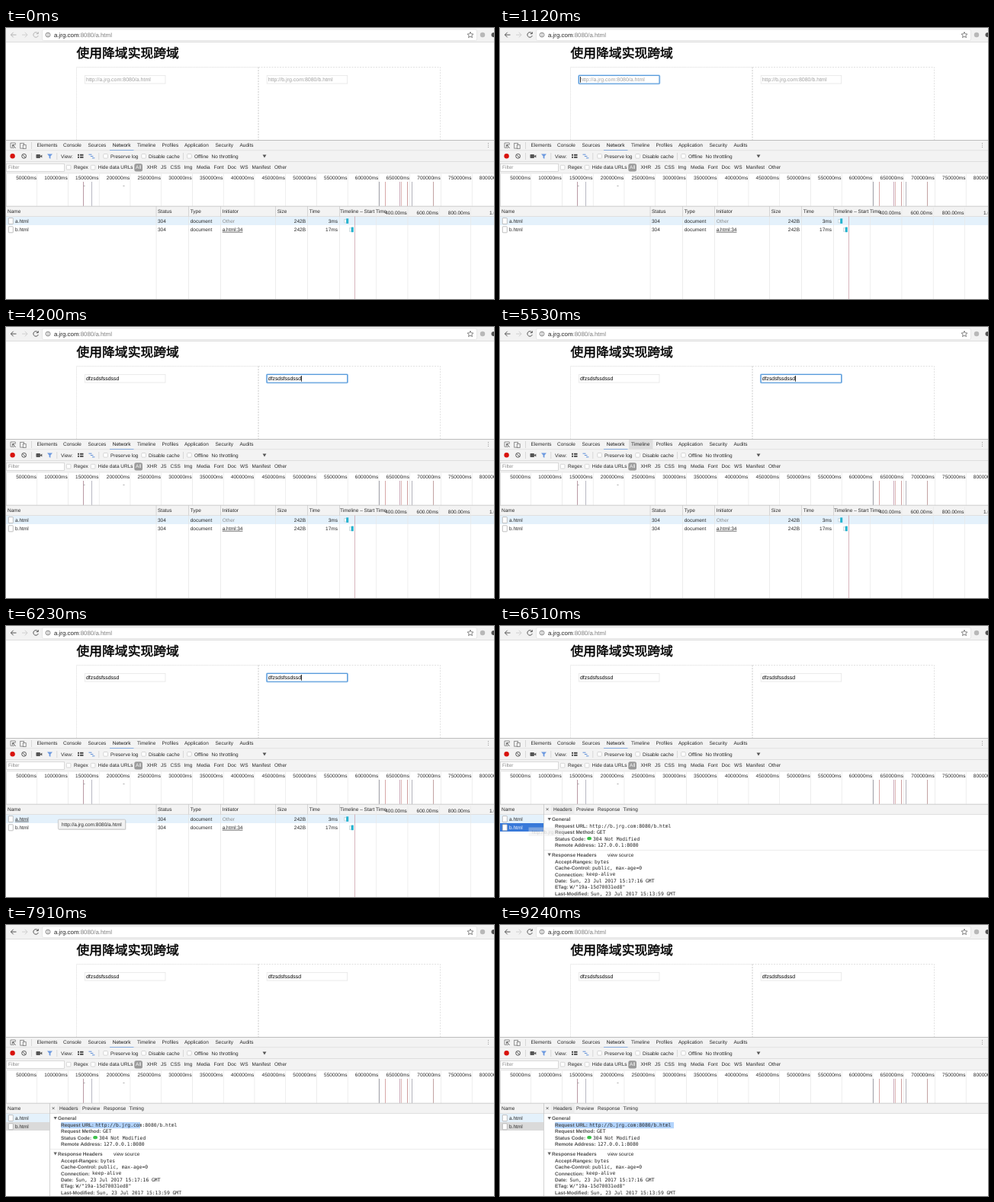
An HTML page that plays this animation: 640 px wide and 356 px high, repeating every 9310 ms.

```html
<!DOCTYPE html>
<html lang="zh">
<head>
<meta charset="utf-8">
<title>使用降域实现跨域</title>
<style>
  html, body { margin: 0; width: 100%; height: 100%; overflow: hidden; background: #fff; }
  svg { display: block; width: 640px; height: 356px; }
  text {
    font: 6.5px "Liberation Sans", Arial, sans-serif;
    fill: #282828;
    text-rendering: geometricPrecision;
    white-space: pre;
  }
  .b { font-weight: 700; fill: #505050; }
  .mono { font: 6.36px "DejaVu Sans Mono", monospace; fill: #222; }
  .field { font-size: 6.9px; fill: #000; }
  .hint { font-size: 7px; fill: #a0a0a0; }
  .url { font-size: 7.9px; fill: #222; }
  .title {
    font: 400 16.8px "Noto Sans CJK SC", "Noto Sans CJK", sans-serif;
    fill: #000; stroke: #000; stroke-width: .5px;
  }
  .dim { fill: #8a8a8a; }
  .white { fill: #fff; }
  .strong { fill: #111; }
  .end { text-anchor: end; }
  .under { text-decoration: underline; }
</style>
</head>
<body>
<svg id="stage" viewBox="0 0 640 356" xmlns="http://www.w3.org/2000/svg"></svg>
<script>
const LOOP = 9310;

const text = (x, y, s, cls = '', extra = '') =>
  `<text x="${x}" y="${y}" dy=".355em" class="${cls}" ${extra}>${s}</text>`;
const rect = (x, y, w, h, fill, extra = '') =>
  `<rect x="${x}" y="${y}" width="${w}" height="${h}" fill="${fill}" ${extra}/>`;
const path = (d, stroke, width = 1, extra = '') =>
  `<path d="${d}" fill="none" stroke="${stroke}" stroke-width="${width}" ${extra}/>`;
const vline = (x, y1, y2, color, w = 1) => rect(x, y1, w, y2 - y1, color);
const hline = (y, color, x1 = 0, x2 = 640) => rect(x1, y, x2 - x1, 1, color);
const group = (id, body) => `<g id="${id}">${body}</g>`;
const labels = (y, items, cls) => items.map(([x, s]) => text(x, y, s, cls)).join('');
const checkbox = (x, y) =>
  rect(x - 2.7, y - 2.8, 5.6, 5.6, '#fff', 'stroke="#c8c8c8" stroke-width=".7" rx="1"');
const docIcon = y => rect(3.3, y - 4, 6, 8, '#fff', 'stroke="#a5a5a5" stroke-width=".7" rx=".6"');

function browserBar() {
  return rect(0, 0, 640, 18, '#f2f2f2') + hline(18, '#dedede') +
    rect(47.5, 2, 570, 14.5, '#fff', 'rx="2" stroke="#dedede" stroke-width=".7"') +
    group('nav',
      path('M13.5 9H6.5M9.7 5.7L6.4 9l3.3 3.3', '#555') +
      path('M41.8 6.9A3.3 3.3 0 1 0 42.3 10M42.3 5.2V7.6H39.8', '#555')) +
    path('M21 9h7M24.8 5.7L28.1 9l-3.3 3.3', '#cfcfcf') +
    '<circle cx="55" cy="9" r="2.9" fill="none" stroke="#666" stroke-width=".8"/>' +
    rect(54.6, 8.4, .9, 2.2, '#666') + rect(54.6, 7, .9, .8, '#666') +
    text(63, 9, 'a.jrg.com<tspan fill="#7c7c7c">:8080/a.html</tspan>', 'url') +
    path('M609 5.2l1.1 2.6 2.8.2-2.1 1.9.7 2.7-2.5-1.5-2.5 1.5.7-2.7-2.1-1.9 2.8-.2z', '#666', .8) +
    '<circle cx="625" cy="9" r="3.2" fill="#b8b8b8"/><circle cx="639.5" cy="9" r="3" fill="#555"/>';
}

function inputBox(id, x, url) {
  return rect(x, 62.5, 105.5, 10.5, '#fff', 'stroke="#e6e6e6" stroke-width=".8"') +
    group('ring' + id,
      rect(x, 62.5, 105.5, 10.5, 'none', 'rx=".8" stroke="#a9cdf0" stroke-width="2.6"') +
      rect(x, 62.5, 105.5, 10.5, '#fff', 'rx=".5" stroke="#5a9cdb" stroke-width="1.2"')) +
    text(x + 1.5, 67.6, url, 'hint', `id="hint${id}"`) +
    text(x + 1.5, 67.6, '', 'field', `id="text${id}"`) +
    rect(0, 64, .8, 7.6, '#000', `id="caret${id}"`);
}

function page() {
  const dash = 'stroke-dasharray="2 1.5"';
  return text(92.5, 32.6, '使用降域实现跨域', 'title') +
    path('M92.5 147V51.5H331', '#dedede', .8, 'stroke-dasharray="1.4 .7"') +
    path('M331 51.5H569.5V147', '#dadada', .8, dash) +
    path('M331 51.5V147', '#c8c8c8', 1, dash) +
    inputBox('A', 103.5, 'http://a.jrg.com:8080/a.html') +
    inputBox('B', 342.2, 'http://b.jrg.com:8080/b.html');
}

function tabBar() {
  const y = 153.7;
  return rect(0, 147, 640, 14, '#f3f3f3') + hline(147, '#bdbdbd') + hline(160.5, '#d8d8d8') +
    rect(169, 148, 31.5, 12.5, '#dedede', 'id="tabHover"') +
    path('M11 157.3H6V151h6.3v2.6', '#777', .8) + path('M8.7 153.6l4 4.2M8.7 156.4v-2.8h2.8', '#555', .9) +
    rect(18.7, 151.3, 4.8, 6.8, 'none', 'stroke="#777" stroke-width=".8"') +
    rect(22.3, 153.6, 3.9, 4.8, '#f3f3f3', 'stroke="#777" stroke-width=".8"') +
    vline(33, 150, 159, '#ccc', .7) +
    labels(y, [[40.5, 'Elements'], [75, 'Console'], [107.5, 'Sources'], [172, 'Timeline'],
      [204.5, 'Profiles'], [234, 'Application'], [274.5, 'Security'], [306.5, 'Audits']]) +
    text(139.7, y, 'Network', 'strong') +
    rect(136, 160, 31.5, .9, '#7da6e0') +
    [151.5, 154, 156.5].map(v => rect(632, v - .5, 1, 1, '#999')).join('');
}

function toolBar() {
  const y = 168.3, seps = [33, 66.5, 121.5, 232];
  return rect(0, 161.3, 640, 14, '#f3f3f3') + hline(175, '#dedede') +
    seps.map(x => vline(x, 164, 173, '#ccc', .7)).join('') +
    `<circle cx="8.6" cy="${y}" r="3.2" fill="#d8120c"/>` +
    `<circle cx="23.6" cy="${y}" r="2.9" fill="none" stroke="#555"/>` + path('M21.6 166.3l4 4', '#555') +
    rect(39.5, 166, 5.4, 5, '#555', 'rx=".8"') + '<path d="M44.5 168.5l2.8-2v4z" fill="#555"/>' +
    '<path d="M54 165.6h7l-2.6 3v3.2l-1.8-.9v-2.3z" fill="#6d9ae0"/>' +
    [165.8, 168.8].map(v => rect(94, v, 2, 2, '#4a4a4a') + rect(97, v, 4.5, 2, '#4a4a4a')).join('') +
    path('M108.5 166.2h4M110.8 168.5h3.6M113 170.8h3.4', '#5f8fd8', 1) +
    [130.5, 180.5, 240.3].map(x => checkbox(x, y)).join('') +
    labels(y, [[72, 'View:'], [137, 'Preserve log'], [187, 'Disable cache'], [247, 'Offline'], [269.5, 'No throttling']]) +
    '<path d="M336.6 166.6h4.8l-2.4 4z" fill="#555"/>';
}

function filterBar() {
  const y = 183.1;
  return rect(0, 176, 640, 15, '#f3f3f3') + hline(190.6, '#d8d8d8') +
    rect(.5, 178.3, 76, 10, '#fff', 'stroke="#cacaca" stroke-width=".7"') +
    text(3, y, 'Filter', 'dim') + checkbox(82, y) + checkbox(114, y) +
    rect(168.3, 178.2, 10.7, 10.2, '#9b9b9b', 'rx="2.5"') + text(170.1, y, 'All', 'white') +
    labels(y, [[89, 'Regex'], [120.7, 'Hide data URLs'], [184.5, 'XHR'], [203, 'JS'], [215.5, 'CSS'], [233.5, 'Img'],
      [250, 'Media'], [272.5, 'Font'], [290.5, 'Doc'], [307, 'WS'], [322.5, 'Manifest'], [352, 'Other']]);
}

function overview() {
  let s = rect(0, 191.3, 640, 43, '#fff');
  for (let i = 1; i <= 16; i++) {
    const x = i * 40.75;
    s += vline(x - .4, 191.5, 234, '#e6e6e6', .7) + text(x - .8, 196.5, i * 50000 + 'ms', 'end');
  }
  const marks = [[101, '#b99aa4'], [112, '#b8b8c2'], [489, '#a2a2aa'], [497, '#d8a8a8'], [516, '#cbaab9'],
    [518, '#dcb4b4'], [526, '#cf9f9f'], [532, '#b2b2ba'], [560, '#c2a3a3']];
  return s + marks.map(([x, c]) => vline(x, 202, 234, c)).join('') +
    rect(101.5, 207, 2, .8, '#999') + rect(153.5, 207, 2, .8, '#999') + vline(0, 191.5, 234, '#ccc', .7);
}

const names = (id, bg = '') =>
  rect(0, 248, 640, 11, '#e4f1fb') + bg + docIcon(253.6) + docIcon(264.8) +
  text(12, 253.4, 'a.html', '', `id="${id}A"`) + text(12, 264.5, 'b.html', '', `id="${id}B"`);

function table() {
  const cols = [196.7, 239.3, 281, 353, 395.2, 437.2];
  let s = rect(0, 234, 640, 122, '#fff') + rect(0, 234, 640, 13.5, '#f3f3f3') +
    hline(233.7, '#cecece') + hline(247.3, '#d6d6d6') + names('row');
  s += cols.map(x => vline(x, 234, 247.5, '#c8c8c8', .7) + vline(x, 248, 356, '#e4e4e4', .7)).join('');
  for (let i = 0; i < 4; i++) s += vline(485.3 + i * 41.3, 236, 356, '#e8e8e8', .7);
  s += labels(240.5, [[2, 'Name'], [199, 'Status'], [241.7, 'Type'], [283.7, 'Initiator'], [355.7, 'Size'],
    [397.7, 'Time'], [438, 'Timeline – Start Time']]);
  [400, 600, 800].forEach((v, i) => s += text(525.8 + i * 41.3, 243, v + '.00ms', 'end'));
  s += text(634, 243, '1.00s');
  const row = (y, who, time) => labels(y, [[199, '304'], [241.7, 'document']]) + who +
    text(393, y, '242B', 'end') + text(435, y, time, 'end');
  s += row(253.4, text(283.7, 253.4, 'Other', 'dim'), '3ms') +
    row(264.5, text(283.7, 264.5, 'a.html:34', 'under'), '17ms');
  const bar = (x, y) => rect(x, y - 2, 2.5, 4.4, '#fff', 'stroke="#b4c6cc" stroke-width=".6"') +
    rect(x + 2.4, y - 3.2, 3, 6.6, '#25b3cf');
  return s + vline(457, 247.5, 356, '#cfa3ad', .8) + bar(443.8, 253.5) + bar(450.4, 264.8);
}

function details() {
  const pair = (y, key, x, value) => text(72, y, key + ':', 'b') + text(x, y, value, 'mono');
  const arrow = y => `<path d="M62.5 ${y - 1.8}h4.4l-2.2 3.8z" fill="#666"/>`;
  return rect(0, 234, 640, 122, '#fff') + rect(0, 234, 640, 13.5, '#f3f3f3') +
    hline(233.7, '#cecece') + hline(247.3, '#d6d6d6') +
    names('item', rect(0, 259, 57, 11, '#3879d9', 'id="itemBg"')) +
    rect(57, 248, 583, 108, '#fff') + vline(57, 234, 356, '#c8c8c8', .8) +
    rect(67, 235, 30.5, 12.3, '#ececec') +
    path('M60.6 239.2l3 3M63.6 239.2l-3 3', '#555', .8) +
    labels(240.7, [[2, 'Name'], [70, 'Headers'], [100, 'Preview'], [128, 'Response'], [161.5, 'Timing']]) +
    rect(72, 259, 0, 8.2, '#b3d4fc', 'id="selection"') +
    arrow(253.7) + text(68, 253.7, 'General', 'b') +
    pair(262.7, 'Request URL', 117.2, 'http://b.jrg.com:8080/b.html') +
    pair(271.1, 'Request Method', 127, 'GET') +
    pair(279.5, 'Status Code', 122, '304 Not Modified') +
    rect(114.2, 277.1, 5.8, 4.2, '#3fc04d', 'rx="2"') +
    pair(287.9, 'Remote Address', 128, '127.0.0.1:8080') +
    hline(294, '#ececec', 58) +
    arrow(300.4) + text(68, 300.4, 'Response Headers', 'b') + text(141, 300.4, 'view source') +
    pair(309.4, 'Accept-Ranges', 124, 'bytes') +
    pair(317.8, 'Cache-Control', 121, 'public, max-age=0') +
    pair(326.2, 'Connection', 113, 'keep-alive') +
    pair(334.7, 'Date', 91.5, 'Sun, 23 Jul 2017 15:17:16 GMT') +
    pair(343.1, 'ETag', 91.5, 'W/"19a-15d70031ed8"') +
    pair(351.5, 'Last-Modified', 119, 'Sun, 23 Jul 2017 15:13:59 GMT');
}

const tooltip = () => group('tip',
  rect(69, 255, 88.5, 13, '#000', 'opacity=".12" rx="1"') +
  rect(68.4, 254.2, 88.2, 12.8, '#f2f2f2', 'rx="1" stroke="#bbb" stroke-width=".7"') +
  text(73, 260.7, 'http://a.jrg.com:8080/a.html'));
const fadingTip = () => group('ghost',
  rect(37.5, 264.5, 47, 11.5, '#e8e8e8') + text(41.5, 270.4, 'http://b.jrg', 'dim'));

const stage = document.getElementById('stage');
stage.innerHTML = browserBar() + page() + tabBar() + toolBar() + filterBar() + overview() +
  group('table', table()) + group('details', details()) + tooltip() + fadingTip();

const el = id => document.getElementById(id);
const show = (id, on) => el(id).style.display = on ? '' : 'none';

const WORD = 'dfzsdsfssdssd';
const KEYS = [1540, 1680, 2100, 2240, 2380, 2590, 2730, 2870, 3570, 3710, 3850, 3990, 4130];
const LOADED = 140, FOCUS_A = 1050, FOCUS_B = 3150, OPEN = 6440, PRESS = 7700;
const DRAG = [[7770, 40], [7910, 104], [8050, 156]];

function draw(t) {
  const typed = WORD.slice(0, KEYS.filter(k => k <= t).length);
  const focus = { A: t >= FOCUS_A && t < FOCUS_B, B: t >= FOCUS_B && t < OPEN };
  for (const id of ['A', 'B']) {
    const field = el('text' + id);
    field.textContent = typed;
    show('hint' + id, !typed);
    show('ring' + id, focus[id]);
    show('caret' + id, focus[id]);
    el('caret' + id).setAttribute('x', +field.getAttribute('x') + (typed ? field.getComputedTextLength() : 0));
  }
  el('nav').style.opacity = t < LOADED ? .4 : 1;
  show('tabHover', t >= 5460 && t < 5670);

  const open = t >= OPEN;
  show('table', !open);
  show('details', open);
  el('rowA').style.textDecoration = t >= 5950 && t < 6370 ? 'underline' : '';
  el('rowB').style.textDecoration = t >= 6370 && !open ? 'underline' : '';
  show('tip', t >= 6160 && t < 6370);
  show('ghost', open && t < 6860);
  el('ghost').style.opacity = Math.max(0, .45 * (1 - (t - OPEN) / 400));

  const pressed = t >= PRESS;
  el('itemBg').setAttribute('fill', pressed ? '#dadada' : '#3879d9');
  el('itemB').style.fill = pressed ? '#282828' : '#fff';
  el('selection').setAttribute('width', DRAG.reduce((w, [at, v]) => at <= t ? v : w, 0));
}

const start = performance.now();
function tick() {
  draw((performance.now() - start) % LOOP);
  requestAnimationFrame(tick);
}
tick();
</script>
</body>
</html>
```
